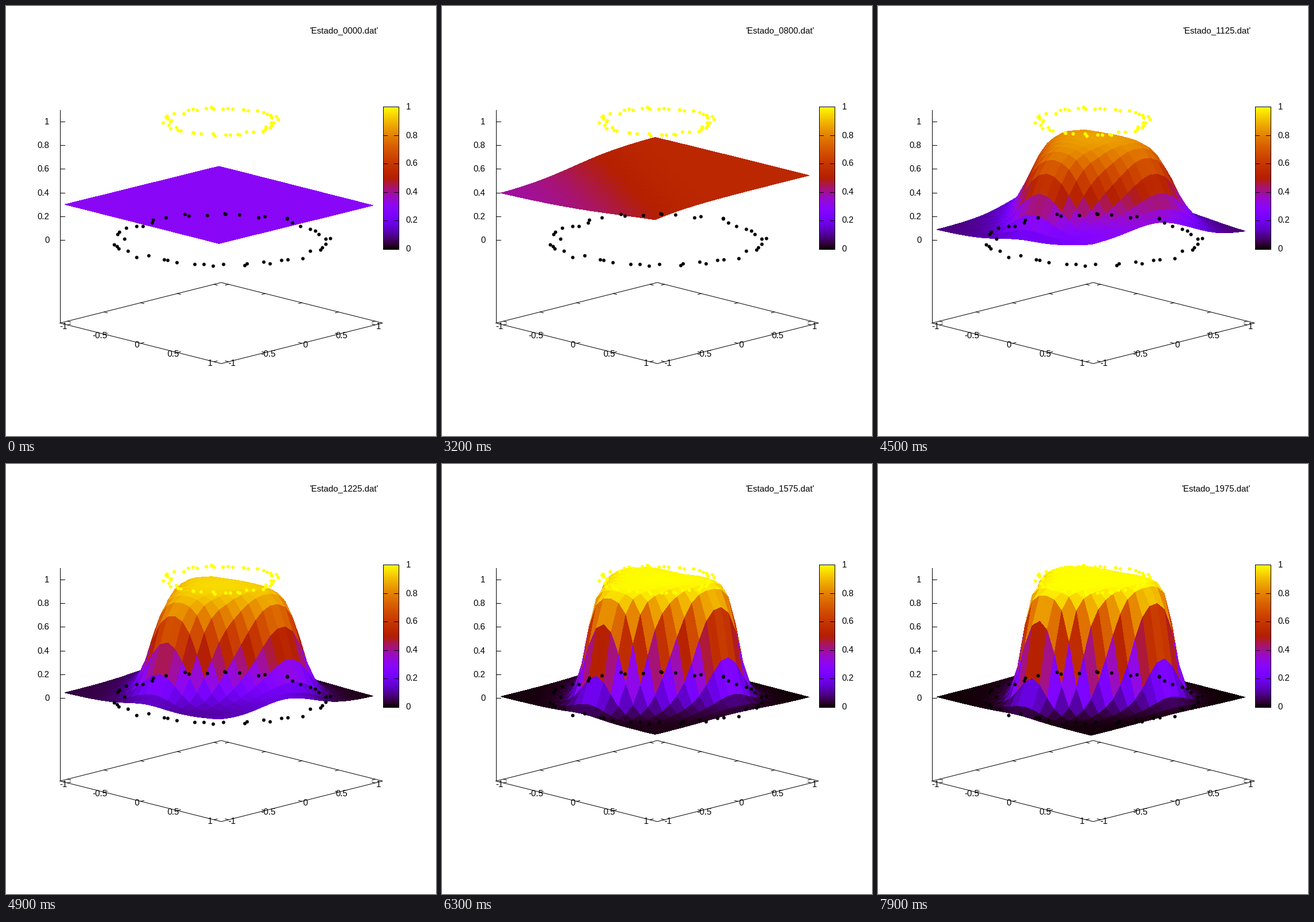
Animation of 748 by 748 pixels, one loop 8000 ms. Source, as a matplotlib script:

```python
import numpy as np
import matplotlib.pyplot as plt
from matplotlib.animation import FuncAnimation
from matplotlib.collections import PolyCollection

SIZE, DPI = 748, 88
PX = 72 / DPI                      # one pixel in points
FRAMES, STEP = 80, 100
CELLS = 21
plt.rcParams["font.family"] = "Liberation Sans"
plt.rcParams["text.hinting"] = "native"

fig = plt.figure(figsize=(SIZE / DPI, SIZE / DPI), dpi=DPI, facecolor="white")
ax = fig.add_axes([0, 0, 1, 1])


def line(xs, ys):
    ax.plot(xs, ys, color="black", lw=PX)


def label(x, y, text, ha="center"):
    return ax.text(x, y, text, ha=ha, va="baseline", fontsize=15 * PX, color="black")


def palette(v):
    v = np.clip(v, 0, 1)
    blue = np.clip(np.sin(2 * np.pi * v), 0, 1)
    return np.stack([np.sqrt(v), v ** 3, blue], axis=-1)


def project(x, y, z):
    return 374.5 + 127.5 * (x + y), 406 + 32.05 * (x - y) - 206 * z


def base(x, y):
    return project(x, y, -0.7015)


def sig(x):
    return 1 / (1 + np.exp(-x))


def logit(z):
    return np.log(z / (1 - z))


# ---- surface model, worked out as logits on the grid ----
I, J = np.meshgrid(np.arange(CELLS + 1), np.arange(CELLS + 1), indexing="ij")
K, M = I + J - CELLS, I - J        # screen right, towards the viewer
GX, GY = 370.5 + 12.76 * K, 405 + 3.2 * M
RAD, ANG = np.hypot(K, M), np.arctan2(M, K)
Q = K - 0.25 * M
LOBES = np.minimum(1, RAD / 6) ** 3 * np.cos(3 * (ANG - np.radians(8)))


def ridge(low, rise, start, width, drop=0.0):
    return logit(low + rise * sig((Q - start) / width) - drop * sig((Q - 10) / 3.5))


def hill(top, left, bottom, right, radius, lobe, width, bump):
    """Rounded three-lobed plateau over a floor set by its corners."""
    a, b = I / CELLS, J / CELLS
    near = (a * (1 - b)) ** 1.5
    floor = left + (bottom - left) * near + (right - left) * a * b
    floor = floor + bump * np.exp(-((K - 10) ** 2 + (M - 11) ** 2) / 80)
    rise = (radius + lobe * LOBES - RAD) / width
    return floor + (top - floor) * sig(rise + np.log(-floor / top))


def settle(rate):
    return lambda p: (1 - np.exp(-rate * p)) / (1 - np.exp(-rate))


TIMES = [0, 1600, 3200, 4000, 4900, 6300, 7900]
STATES = [
    logit(0.291 - 0.0002 * K),
    ridge(0.478, 0.030, -12, 4),
    ridge(0.385, 0.155, -8.5, 4),
    ridge(0.19, 0.44, -9, 2.7, 0.2),
    hill(3, -3.2, -1.94, -4.6, 10.0, 1.1, 1.95, 1.6),
    hill(6, -5, -4.4, -6, 10.2, 1.25, 2.1, 1.0),
    hill(8, -5.5, -5.3, -6.5, 10.2, 1.25, 2.25, 0.8),
]
EASES = [settle(9.4), lambda p: p ** 2, lambda p: p ** 1.5, lambda p: p, settle(3), settle(2)]


def height(t):
    n = min(np.searchsorted(TIMES, t, side="right") - 1, len(EASES) - 1)
    w = EASES[n]((t - TIMES[n]) / (TIMES[n + 1] - TIMES[n]))
    return sig(STATES[n] * (1 - w) + STATES[n + 1] * w)


# ---- axes ----
line([94, 94], [180, 550])
for v in np.arange(0, 1.1, 0.2):
    y = round(406 - 206 * v)
    line([94, 102], [y, y])
    label(75.5, y + 5, f"{v:.1g}", "right")

square = [(-1.1, -1.1), (1.1, -1.1), (1.1, 1.1), (-1.1, 1.1), (-1.1, -1.1)]
line(*zip(*[base(x, y) for x, y in square]))


def tick(x, y, dx, dy):
    line(*zip(base(x, y), base(x + dx, y + dy)))


for v in np.arange(-1, 1.1, 0.5):
    tick(v, -1.1, 0, 0.045)
    tick(v, 1.1, 0, -0.045)
    tick(-1.1, v, 0.045, 0)
    tick(1.1, v, -0.045, 0)
    for (x, y), shift in ((base(v, -1.1), -7), (base(1.1, v), 5.5)):
        label(x + shift, y + 7.5, f"{v:g}")

# ---- colour bar ----
ramp = palette(np.linspace(1, 0, 248))[:, None, :]
ax.imshow(ramp, extent=(656, 684, 422, 174), aspect="auto", interpolation="nearest")
line([656, 683, 683, 656, 656], [174, 174, 422, 422, 174])
for v in np.arange(0, 1.1, 0.2):
    y = round(421.6 - 247.5 * v)
    line([656, 663], [y, y])
    line([675, 683], [y, y])
    label(695.5, y + 4.5, f"{v:.1g}", "left")

# ---- surface ----
ci, cj = (c.ravel() for c in np.meshgrid(np.arange(CELLS), np.arange(CELLS), indexing="ij"))
order = np.argsort(ci - cj, kind="stable")      # back to front
ci, cj = ci[order], cj[order]
QI = np.stack([ci, ci + 1, ci + 1, ci], axis=1)
QJ = np.stack([cj, cj, cj + 1, cj + 1], axis=1)
surface = PolyCollection([], edgecolors="none", linewidths=0, antialiaseds=False, zorder=3)
ax.add_collection(surface, autolim=False)

# ---- two noisy rings of sample points ----
rng = np.random.default_rng(7)


def ring(count, inner, outer, z, color):
    angle = 2 * np.pi * (np.arange(count) + rng.uniform(-0.7, 0.7, count)) / count
    r = rng.uniform(inner, outer, count)
    x, y = project(r * np.cos(angle), r * np.sin(angle), z)
    ax.plot(x, y, "o", color=color, ms=6 * PX, mew=0, zorder=4)


ring(49, 0.47, 0.57, 1, "#ffff00")
ring(50, 0.92, 1.06, 0, "black")

title = label(648, 46.5, "", "right")
# whole coordinates fall on whole pixels
ax.set_xlim(0, SIZE)
ax.set_ylim(SIZE - 1, -1)
ax.axis("off")


def update(n):
    z = height(n * STEP)
    sy = GY - 206 * z
    surface.set_verts(np.stack([GX[QI, QJ], sy[QI, QJ]], axis=-1))
    surface.set_facecolor(palette(z[QI, QJ].mean(axis=1)))
    title.set_text(f"'Estado_{n * 25:04d}.dat'")
    return surface, title


anim = FuncAnimation(fig, update, frames=FRAMES, interval=STEP, repeat=True, repeat_delay=0)
plt.show()
```
